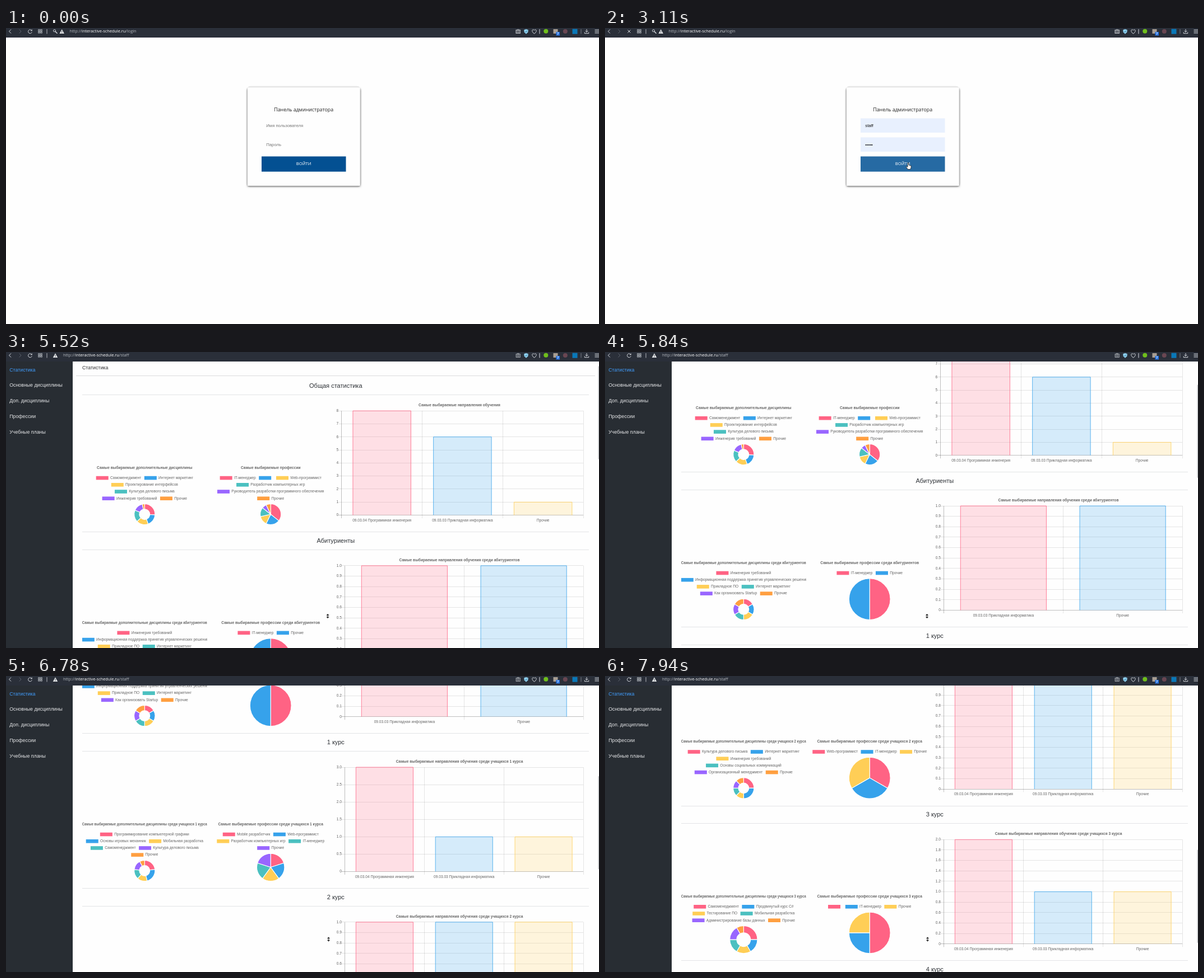
Recreate the animation shown at these times as an HTML page with a canvas. Size 1058x529 px, loop 8000 ms.

```html
<!DOCTYPE html>
<html lang="ru">
<head>
<meta charset="utf-8">
<title>Интерактивное расписание</title>
<style>
html, body { margin: 0; width: 100%; height: 100%; overflow: hidden; background: #fefefe; }
canvas { display: block; }
</style>
</head>
<body>
<canvas id="stage" width="1058" height="529"></canvas>
<script>
const ctx = document.getElementById('stage').getContext('2d');
const LOOP = 8000, W = 1058, H = 529, BAR = 17;
const ARIAL = '"Liberation Sans", Arial, sans-serif';
const OPEN = '"Open Sans", "Noto Sans", sans-serif';
const COLORS = ['255,99,132', '54,162,235', '255,206,86', '75,192,192', '153,102,255', '255,159,64'];
const PE = '09.03.04 Программная инженерия', PI = '09.03.03 Прикладная информатика', REST = 'Прочие';
const USER = 'staff', DOTS = '•••••';

// Legend rows are split by "/", items by "|".
const sections = [
  { title: 'Общая статистика', about: '', max: 8, step: 1, digits: 0, left: 598.8,
    bars: [[PE, 8], [PI, 6], [REST, 1]],
    donut: [[7, 5, 5, 5, 4, 1], 'Самоменеджмент|Интернет маркетинг/Проектирование интерфейсов/Культура делового письма/Инженерия требований|Прочие'],
    pie: [[5, 3, 2, 2, 1, 1], 'IT-менеджер||Web-программист/Разработчик компьютерных игр/Руководитель разработки программного обеспечения/Прочие'] },
  { title: 'Абитуриенты', about: ' среди абитуриентов', max: 1, step: .1, digits: 1, left: 604.5,
    bars: [[PI, 1], [REST, 1]],
    donut: [[1, 1, 1, 1, 1, 1], 'Инженерия требований/Информационная поддержка принятия управленческих решений/Прикладное ПО|Интернет маркетинг/Как организовать Startup|Прочие'],
    pie: [[1, 1], 'IT-менеджер|Прочие'] },
  { title: '1 курс', about: ' среди учащихся 1 курса', max: 3, step: .5, digits: 1, left: 604.5,
    bars: [[PE, 3], [PI, 1], [REST, 1]],
    donut: [[3, 3, 2, 2, 2, 1], 'Программирование компьютерной графики/Основы игровых механник|Мобильная разработка/Самоменеджмент|Культура делового письма/Прочие'],
    pie: [[1, 1, 1, 1, 1], 'Mobile разработчик|Web-программист/Разработчик компьютерных игр|IT-менеджер/Прочие'] },
  { title: '2 курс', about: ' среди учащихся 2 курса', max: 1, step: .1, digits: 1, left: 604.5,
    bars: [[PE, 1], [PI, 1], [REST, 1]],
    donut: [[2, 2, 1, 1, 1, 1], 'Культура делового письма|Интернет маркетинг/Инженерия требований/Основы социальных коммуникаций/Организационный менеджмент|Прочие'],
    pie: [[1, 1, 1], 'Web-программист|IT-менеджер|Прочие'] },
  { title: '3 курс', about: ' среди учащихся 3 курса', max: 2, step: .2, digits: 1, left: 604.5,
    bars: [[PE, 2], [PI, 1], [REST, 1]],
    donut: [[3, 2, 2, 2, 2, 1], 'Самоменеджмент|Продвинутый курс C#/Тестирование ПО|Мобильная разработка/Администрирование базы данных|Прочие'],
    pie: [[2, 1, 1], '|IT-менеджер|Прочие'] },
  { title: '4 курс' }
];

// Keys: time, values...
const SCROLL = [[5520, 1.7], [6240, 321], [7210, 643], [7940, 921.7]];
const CURSOR = [[680, 405, 528], [1060, 528, 166], [1710, 528, 166], [1890, 530, 210], [2410, 530, 210],
  [2710, 541, 241], [3500, 541, 241], [3880, 626, 265], [4300, 626, 265], [4640, 569, 422], [4800, 569, 422],
  [4920, 567, 419], [5130, 567, 419], [5150, 562, 417], [5330, 562, 417], [5500, 574, 472],
  [5900, 574.5, 472], [6240, 575.5, 470.5]];

function track(keys, t, ease = p => p) {
  const last = keys[keys.length - 1];
  if (t >= last[0]) return last.slice(1);
  if (t <= keys[0][0]) return keys[0].slice(1);
  const i = keys.findIndex(k => k[0] > t), a = keys[i - 1], b = keys[i];
  const p = ease((t - a[0]) / (b[0] - a[0]), i);
  return a.slice(1).map((v, n) => v + (b[n + 1] - v) * p);
}
const hold = (t, start, step) => start + Math.floor((t - start) / step + 1e-6) * step;
const smooth = p => p * p * (3 - 2 * p);

function rect(x, y, w, h, fill) { ctx.fillStyle = fill; ctx.fillRect(x, y, w, h); }
function hline(x1, x2, y, color) { rect(x1, Math.floor(y), x2 - x1, 1, color); }
function vline(x, y1, y2, color) { rect(Math.floor(x), y1, 1, y2 - y1, color); }
function text(s, x, y, size, color, { align = 'left', weight = 400, family = ARIAL, max } = {}) {
  ctx.font = `${weight} ${size}px ${family}`;
  ctx.textAlign = align;
  ctx.textBaseline = 'middle';
  ctx.fillStyle = color;
  ctx.fillText(s, x, y, max);
}
function path(points, { stroke, fill, width = 1, close = false }) {
  ctx.beginPath();
  points.forEach(([x, y]) => ctx.lineTo(x, y));
  if (close) ctx.closePath();
  if (fill) { ctx.fillStyle = fill; ctx.fill(); }
  if (stroke) { ctx.strokeStyle = stroke; ctx.lineWidth = width; ctx.stroke(); }
}
function circle(x, y, r, { fill, stroke, from = 0, to = 7 }) {
  ctx.beginPath();
  ctx.arc(x, y, r, from, to);
  if (fill) { ctx.fillStyle = fill; ctx.fill(); }
  if (stroke) { ctx.strokeStyle = stroke; ctx.lineWidth = 1; ctx.stroke(); }
}
function at(x, y, draw) { ctx.save(); ctx.translate(x, y); draw(); ctx.restore(); }

function browserBar(loading, login) {
  const ink = '#d9dce1', soft = '#b4b8be';
  rect(0, 0, W, BAR, '#2a2f39');
  path([[9, 2.5], [5.5, 6], [9, 9.5]], { stroke: ink });
  path([[23.5, 2.5], [27, 6], [23.5, 9.5]], { stroke: '#5b616b' });
  if (loading) {
    path([[40.5, 3.5], [45.5, 8.5]], { stroke: ink });
    path([[45.5, 3.5], [40.5, 8.5]], { stroke: ink });
  } else {
    circle(43, 6.3, 3.3, { stroke: ink, from: .3, to: 5.4 });
    path([[46.6, 2.3], [46.6, 5.2], [43.8, 5.2]], { fill: ink, close: true });
  }
  ctx.strokeStyle = soft;
  ctx.lineWidth = 1;
  for (const x of [57.8, 61.8]) for (const y of [2.8, 6.6]) ctx.strokeRect(x, y, 2.4, 2.4);
  rect(72.5, 2, 1, 8.5, soft);
  if (login) {
    circle(86.5, 4.8, 2, { stroke: ink });
    path([[88, 6.3], [91.5, 9.8]], { stroke: ink, width: 1.4 });
  }
  const wx = login ? 99.7 : 88;
  path([[wx, 2.3], [wx + 4.2, 10], [wx - 4.2, 10]], { fill: '#e6e8ea', close: true });
  rect(wx - .4, 5, .9, 2.6, '#2a2f39');
  rect(wx - .4, 8.2, .9, .9, '#2a2f39');

  let x = login ? 113.5 : 102;
  for (const [part, color] of [['http://', soft], ['interactive-schedule.ru', '#fff'], [login ? '/login' : '/' + USER, soft]]) {
    text(part, x, 6.3, 7.35, color, { family: OPEN });
    x += ctx.measureText(part).width;
  }

  ctx.strokeStyle = soft;
  ctx.strokeRect(910.2, 3.7, 7, 5.6);
  rect(912, 2.4, 3.4, 1.4, soft);
  circle(913.7, 6.5, 1.5, { stroke: soft });
  path([[928, 2], [931.8, 3.2], [931.4, 7.4], [928, 10.8], [924.6, 7.4], [924.2, 3.2]], { fill: '#8fd0ee', close: true });
  path([[926.3, 6.2], [927.6, 7.5], [930, 4.8]], { stroke: '#2a6f96' });
  at(942.5, 6, () => {
    ctx.beginPath();
    ctx.moveTo(0, 4.2);
    ctx.bezierCurveTo(-7, -.6, -2.4, -5.6, 0, -1.8);
    ctx.bezierCurveTo(2.4, -5.6, 7, -.6, 0, 4.2);
    ctx.strokeStyle = ink;
    ctx.stroke();
  });
  rect(951.5, 2, 1, 8.5, ink);
  circle(963.3, 5.8, 4, { fill: '#6fbe1c' });
  rect(976.5, 2, 8, 8, '#a89d92');
  rect(981.5, 7, 6.5, 6.5, '#2672e0');
  text('7', 984.8, 10.4, 5.5, '#fff', { align: 'center', weight: 700 });
  circle(997.8, 6, 4, { fill: '#694652' });
  rect(1010.5, 1.7, 9, 9, '#0a78b8');
  rect(1025.5, 2, 1, 8.5, '#777d86');
  path([[1036, 2], [1036, 7.3]], { stroke: ink });
  path([[1033.6, 5], [1036, 7.4], [1038.4, 5]], { stroke: ink });
  path([[1032.3, 7.5], [1032.3, 9.7], [1039.7, 9.7], [1039.7, 7.5]], { stroke: ink });
  for (const y of [3, 5.7, 8.4]) rect(1050.5, y, 7.5, 1, ink);
}

function loginPage(t) {
  const open = t >= 1260 && t < 2220, preview = t >= 1830, mid = { align: 'center', family: OPEN };
  rect(0, BAR, W, H, '#fefefe');
  hline(0, W, BAR, '#f3eef6');
  ctx.fillStyle = '#e7e7e7';
  ctx.beginPath();
  ctx.roundRect(428.7, 103.8, 205.2, 181, 8);
  ctx.fill();
  ctx.save();
  ctx.shadowColor = 'rgba(0,0,0,.5)';
  ctx.shadowBlur = 3.5;
  ctx.shadowOffsetY = 2;
  rect(431, 106.5, 200.5, 175.3, '#fff');
  ctx.restore();
  rect(431, 106.5, 200.5, 175.3, '#fefefe');
  text('Панель администратора', 531.2, 146.8, 8.82, '#222', mid);
  if (preview) for (const y of [161.5, 195.5]) rect(456, y, 150.5, 25.5, '#e8f0fe');
  const ink = preview ? '#111' : '#757575';
  text(preview ? USER : 'Имя пользователя', 464.3, 174.5, 7.71, ink);
  text(preview ? DOTS : 'Пароль', 464.3, 208.5, 7.71, ink);
  rect(456, 229.5, 150.5, 27.2, t >= 2580 ? '#266aa3' : '#035092');
  text('ВОЙТИ', 531.2, 243.4, 7.71, '#fff', mid);
  if (open) {
    rect(455.5, 187.5, 151.5, 66.5, '#d4d4d4');
    rect(456.5, 188.5, 149.5, 64.5, '#fff');
    if (preview) rect(456.5, 192, 149.5, 32, '#eeeeee');
    text(USER, 464.3, 203, 7.71, '#222');
    text(DOTS, 464.3, 214, 7.71, '#777');
  }
}

function legend(spec, center, y) {
  const minX = center - 111.5, box = 22, gap = 3.3, pad = 5.5;
  let color = 0;
  ctx.font = `400 6.61px ${ARIAL}`;
  const rows = spec.split('/').map(row => row.split('|'));
  rows.forEach((items, r) => {
    ctx.font = `400 6.61px ${ARIAL}`;
    const widths = items.map(s => box + gap + ctx.measureText(s).width);
    const total = widths.reduce((a, b) => a + b, pad * (items.length - 1));
    let x = Math.max(minX, center - total / 2);
    items.forEach((s, i) => {
      const cy = y + r * 12.2;
      rect(x, cy - 3.3, box, 6.6, `rgb(${COLORS[color++]})`);
      text(s, x + box + gap, cy, 6.61, '#666');
      x += widths[i] + pad;
    });
  });
  return rows.length;
}

function roundChart(title, [values, names], center, line, hole, grow) {
  ctx.save();
  ctx.beginPath();
  ctx.rect(center - 111.5, line + 120, 223, 125);
  ctx.clip();
  text(title, center, line + 130.3, 6.61, '#666', { align: 'center', weight: 700, max: 223 });
  const rows = legend(names, center, line + 148.5);
  const r = 36.9 - 6.1 * (rows - 1), cy = line + 232 - r;
  const sum = values.reduce((a, b) => a + b);
  let a = -Math.PI / 2;
  values.forEach((v, i) => {
    const b = a + v / sum * 2 * Math.PI * grow;
    ctx.beginPath();
    ctx.arc(center, cy, r, a, b);
    ctx.arc(center, cy, r * hole, b, a, true);
    ctx.closePath();
    ctx.fillStyle = `rgb(${COLORS[i]})`;
    ctx.fill();
    ctx.strokeStyle = '#fff';
    ctx.lineWidth = 1.1;
    ctx.stroke();
    a = b;
  });
  ctx.restore();
}

function barChart(s, line, grow) {
  const { left, max, step, digits, bars } = s, right = 1030, tick = 5.5;
  const top = line + 28.5, bottom = line + 215, height = bottom - top;
  const grid = 'rgba(0,0,0,.1)', axis = 'rgba(0,0,0,.25)', slot = (right - left) / bars.length;
  text('Самые выбираемые направления обучения' + s.about, 809, line + 18.7, 6.61, '#666', { align: 'center', weight: 700 });
  for (let i = 0; i <= Math.round(max / step); i++) {
    const y = bottom - i * step / max * height;
    hline(left - tick, right, y, i ? grid : axis);
    text(i ? (i * step).toFixed(digits) : '0', left - tick, y, 6.61, '#666', { align: 'right' });
  }
  for (let i = 0; i <= bars.length; i++) vline(left + i * slot, top, bottom + tick, i ? grid : axis);
  bars.forEach(([name, value], i) => {
    const w = slot * .72, x = left + slot * (i + .5) - w / 2, h = value / max * height * grow;
    rect(x, bottom - h, w, h, `rgba(${COLORS[i]},.2)`);
    path([[x, bottom], [x, bottom - h], [x + w, bottom - h], [x + w, bottom]], { stroke: `rgb(${COLORS[i]})`, width: .8 });
    text(name, x + w / 2, line + 224.3, 6.61, '#666', { align: 'center' });
  });
}

function statsPage(t) {
  let scroll = 0;
  if (t >= 5520) {
    const held = t < 6240 ? hold(t, 5520, 60) : hold(t, 6240, 106.25);
    scroll = track(SCROLL, t >= 7210 && t < 7300 ? 7210 : held, (p, i) => i === 1 ? p ** 1.25 : p)[0];
  }
  const progress = Math.min(1, (hold(t, 3530, 88) - 3436) / 1000);
  const grow = 1 - (1 - progress) ** 4, rule = '#e3e4e6';

  rect(0, BAR, W, H, '#fefefe');
  text('Статистика', 136, 30.5 - scroll, 8.82, '#303133');
  hline(125, 1051, 44 - scroll, '#dadbdd');
  sections.forEach((s, i) => {
    const line = 78.3 + 276.8 * i - scroll;
    if (line < -260 || line > H + 30) return;
    text(s.title, 588.3, line - 15.8, 11.02, '#2c3035', { align: 'center' });
    hline(136, 1040, line, rule);
    if (!s.bars) return;
    hline(136, 1040, line + 245, rule);
    if (t < 3530) return;
    roundChart('Самые выбираемые дополнительные дисциплины' + s.about, s.donut, 247.3, line, .5, grow);
    roundChart('Самые выбираемые профессии' + s.about, s.pie, 472.2, line, 0, grow);
    barChart(s, line, grow);
  });
  rect(1056.5, 25 + scroll * .31, 1.5, 166, '#c6c8ca');

  rect(0, BAR, 119, H, '#282d33');
  ['Статистика', 'Основные дисциплины', 'Доп. дисциплины', 'Профессии', 'Учебные планы'].forEach((s, i) =>
    text(s, 6.2, 32.2 + 27.85 * i, 8.82, i ? '#e4e5e7' : '#409eff'));
}

function pointer(t) {
  if (t < 680) return;
  const [x, y] = track(CURSOR, t, smooth);
  at(x, y, () => {
    const onField = t >= 980 && t < 1760, onLink = t >= 1830 && t < 3230;
    if (t >= 5500) {
      path([[0, -4], [2.6, -1.3], [-2.6, -1.3]], { fill: '#111', close: true });
      path([[0, 4], [2.6, 1.3], [-2.6, 1.3]], { fill: '#111', close: true });
      circle(0, 0, .8, { fill: '#111' });
    } else if (onField) {
      path([[0, -5], [0, 5]], { stroke: '#222' });
      path([[-2, -5], [2, -5]], { stroke: '#222' });
      path([[-2, 5], [2, 5]], { stroke: '#222' });
    } else if (onLink) {
      path([[-.8, 0], [.8, 0], [1, 4], [5, 5.2], [5.2, 8], [3.8, 11.5], [-.8, 11.5], [-3.6, 7.2], [-3, 6], [-1, 7.4]],
        { fill: '#fff', stroke: '#222', width: .8, close: true });
    } else {
      path([[0, 0], [0, 9], [2, 7.2], [3.4, 10.4], [4.8, 9.8], [3.4, 6.7], [6, 6.5]],
        { fill: '#fff', stroke: '#222', width: .8, close: true });
    }
  });
}

function draw(t) {
  const login = t < 3230;
  if (login) loginPage(t); else statsPage(t);
  browserBar(t >= 3110 && t < 3330, login);
  pointer(t);
}

const start = performance.now();
function tick() {
  draw((performance.now() - start) % LOOP);
  requestAnimationFrame(tick);
}
tick();
</script>
</body>
</html>
```
